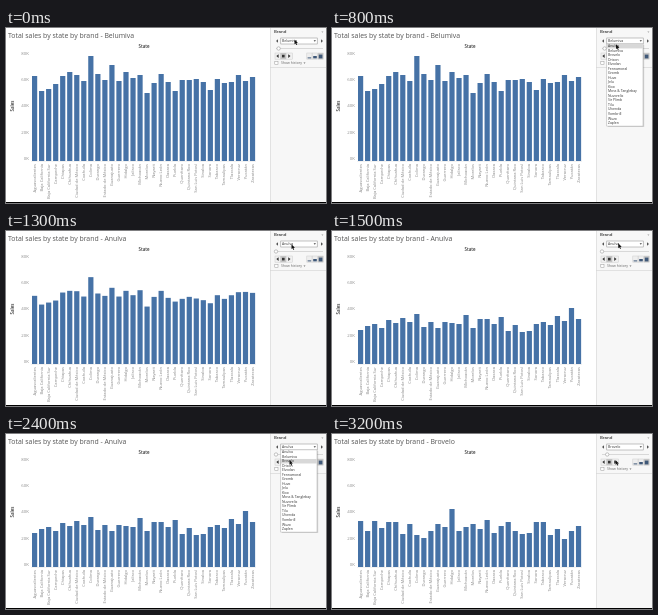
An HTML page with a canvas for the animation above (3.3 s loop, 320 by 175 pixels).

```html
<!DOCTYPE html>
<html lang="en">
<head>
<meta charset="utf-8">
<title>Sales by state</title>
<style>
html, body { margin: 0; width: 100%; height: 100%; overflow: hidden; background: #fff; }
canvas { display: block; width: 320px; height: 175px; }
</style>
</head>
<body>
<canvas id="stage"></canvas>
<script>
const W = 320, H = 175, LOOP = 3300, STEP = 100, BASE = 133;
const FONT = '"Open Sans", "Noto Sans", sans-serif';
const canvas = document.getElementById('stage');
const ctx = canvas.getContext('2d');
const dpr = window.devicePixelRatio || 1;
canvas.width = W * dpr;
canvas.height = H * dpr;

const brands = ['Anulva', 'Belumiva', 'Brovelo', 'Drixon', 'Elvodan', 'Fennamoral',
  'Gromb', 'Huvo', 'Jelu', 'Kixo', 'Moss & Tanglebay', 'Nuvorelix', 'Sir Plimb',
  'Tilu', 'Ulvenda', 'Vombrill', 'Wuzo', 'Zaplen'];

const states = ['Aguascalientes', 'Baja California', 'Baja California Sur', 'Campeche',
  'Chiapas', 'Chihuahua', 'Ciudad de México', 'Coahuila', 'Colima', 'Durango',
  'Estado de México', 'Guanajuato', 'Guerrero', 'Hidalgo', 'Jalisco', 'Michoacán',
  'Morelos', 'Nayarit', 'Nuevo León', 'Oaxaca', 'Puebla', 'Querétaro', 'Quintana Roo',
  'San Luis Potosí', 'Sinaloa', 'Sonora', 'Tabasco', 'Tamaulipas', 'Tlaxcala',
  'Veracruz', 'Yucatán', 'Zacatecas'];

// Top edge of each bar, by brand index
const tops = [
  [99, 95, 93, 97, 89, 92, 87, 91, 83, 96, 91, 97, 91, 92, 93, 84,
   97, 88, 88, 93, 86, 100, 94, 101, 100, 93, 91, 94, 85, 90, 77, 88],
  [48, 63, 61, 56, 48, 44, 47, 53, 28, 46, 52, 37, 53, 44, 50, 47,
   65, 55, 46, 54, 63, 52, 52, 51, 54, 62, 51, 55, 54, 47, 53, 49],
  [87, 97, 87, 94, 88, 88, 100, 90, 101, 104, 97, 90, 93, 75, 97, 93,
   90, 95, 86, 99, 92, 88, 97, 100, 99, 88, 88, 101, 95, 105, 97, 92]
];

const cursorPath = [
  [0, 288.5, 11.5], [500, 288.5, 11.5], [800, 284, 16.3], [1100, 284, 16.3],
  [1300, 285.5, 13.3], [1600, 286.5, 12], [1900, 286.5, 12], [2100, 285, 16.5],
  [2400, 283.5, 26], [3300, 283.5, 26]
];
const clicks = [[400, 700], [1000, 1200], [1600, 1900], [2600, 2800]];

const within = (t, a, b) => t >= a && t < b;
const lerp = (a, b, u) => a + (b - a) * u;
function ease(t, a, b) {
  const u = Math.min(1, Math.max(0, (t - a) / (b - a)));
  return u * u * (3 - 2 * u);
}

function cursorAt(t) {
  const i = Math.max(1, cursorPath.findIndex(p => p[0] > t));
  const [a, b] = [cursorPath[i - 1], cursorPath[i]];
  const u = ease(t, a[0], b[0]);
  return { x: lerp(a[1], b[1], u), y: lerp(a[2], b[2], u) };
}

function rect(x, y, w, h, fill) {
  ctx.fillStyle = fill;
  ctx.fillRect(x, y, w, h);
}

function frame(x, y, w, h, stroke, fill) {
  if (fill) rect(x, y, w, h, fill);
  ctx.strokeStyle = stroke;
  ctx.lineWidth = 0.5;
  ctx.strokeRect(x, y, w, h);
}

function poly(points, fill) {
  ctx.beginPath();
  points.forEach(([x, y]) => ctx.lineTo(x, y));
  ctx.closePath();
  ctx.fillStyle = fill;
  ctx.fill();
}

function circle(x, y, r, stroke, width, fill) {
  ctx.beginPath();
  ctx.arc(x, y, r, 0, Math.PI * 2);
  if (fill) { ctx.fillStyle = fill; ctx.fill(); }
  ctx.strokeStyle = stroke;
  ctx.lineWidth = width;
  ctx.stroke();
}

function label(str, x, y, size, color, { align = 'left', weight = 400, turn = false, base = 'middle' } = {}) {
  ctx.save();
  ctx.translate(x, y);
  if (turn) ctx.rotate(-Math.PI / 2);
  ctx.font = `${weight} ${size}px ${FONT}`;
  ctx.textAlign = align;
  ctx.textBaseline = base;
  ctx.fillStyle = color;
  ctx.fillText(str, 0, 0);
  ctx.restore();
}

function drawChart(brand, from, to, u) {
  label('Total sales by state by brand - ' + brands[brand], 2, 10, 6.9, '#555', { base: 'alphabetic' });
  label('State', 138, 19.2, 4.4, '#333', { align: 'center', weight: 600 });
  label('Sales', 7.2, 78, 4.4, '#333', { align: 'center', weight: 600, turn: true });
  for (let k = 0; k < 5; k++) {
    label(k * 20 + 'K', 22.8, 130.6 - k * 26.15, 4.3, '#8a8a8a', { align: 'right' });
  }
  rect(25, BASE, 225, 0.4, '#ddd');
  states.forEach((name, i) => {
    const x = 26 + i * 7.03, y = lerp(tops[from][i], tops[to][i], u);
    rect(x, y, 5.2, BASE - y, '#4672a6');
    label(name, x + 2.6, 136, 4.1, '#858585', { align: 'right', turn: true });
  });
}

function drawPanel(brand) {
  rect(264, 0, 56, H, '#f7f7f7');
  rect(264, 0, 0.6, H, '#d4d4d4');
  rect(264, 39, 56, 0.6, '#d4d4d4');
  label('Brand', 268, 4.2, 4.3, '#333', { weight: 600 });
  poly([[315.4, 3.6], [317.4, 3.6], [316.4, 4.8]], '#999');

  poly([[272, 11.3], [272, 14.7], [270, 13]], '#555');
  poly([[315, 11.3], [315, 14.7], [317, 13]], '#555');
  frame(274.8, 10, 36.4, 6, '#888', '#fff');
  label(brands[brand], 276, 13, 3.5, '#333');
  poly([[307.6, 12.2], [310, 12.2], [308.8, 13.8]], '#444');

  rect(270, 20.2, 47, 0.7, '#ccc');
  circle(270 + brand * 2.6, 20.5, 1.7, '#888', 0.5, '#fff');

  frame(269, 25, 17.5, 6.2, '#ccc', '#f0f0f0');
  rect(274.3, 25, 6, 6.2, '#c4c4c4');
  poly([[272.6, 26.2], [272.6, 30], [270.3, 28.1]], '#333');
  rect(276, 26.8, 2.6, 2.6, '#333');
  poly([[282.2, 26.2], [282.2, 30], [284.5, 28.1]], '#333');

  [1, 2.4, 3.8].forEach((h, i) => {
    const x = 300.8 + i * 5.6;
    frame(x, 25, 5.2, 6.2, '#ccc', i === 2 ? '#c4c4c4' : '#eee');
    rect(x + 0.8, 30.4 - h, 3.6, h, '#3f5878');
  });

  frame(268.8, 33.4, 3.2, 3.2, '#999', '#fff');
  label('Show history', 275, 35.2, 3.5, '#666');
  poly([[297.5, 34.5], [299.5, 34.5], [298.5, 35.8]], '#666');
}

function drawList(hover) {
  const top = 15.9, row = 4.53;
  rect(276, 17, 36.2, 82, 'rgba(0,0,0,0.15)');
  frame(274.8, top, 36.2, 82.2, '#aaa', '#fff');
  rect(275, top + hover * row, 35.8, row, '#d8d8d8');
  brands.forEach((name, i) => label(name, 276, top + (i + 0.5) * row, 3.45, '#333'));
}

function drawCursor({ x, y }) {
  const shape = [[0, 0], [0, 4.8], [1.1, 3.9], [1.9, 5.6], [2.7, 5.2], [1.9, 3.6], [3.4, 3.5]];
  poly(shape.map(([dx, dy]) => [x + dx, y + dy]), '#111');
}

function draw(t) {
  ctx.setTransform(dpr, 0, 0, dpr, 0, 0);
  rect(0, 0, W, H, '#fff');

  const brand = t < 1200 ? 1 : t < 2900 ? 0 : 2;
  if (t < 2800) drawChart(brand, 1, 0, ease(t, 1175, 1500));
  else drawChart(brand, 0, 2, ease(t, 2875, 3200));

  drawPanel(brand);
  const cursor = cursorAt(t);
  if (within(t, 500, 1200) || within(t, 1700, 2900)) {
    drawList(Math.max(0, Math.floor((cursor.y - 15.9) / 4.53)));
  }
  drawCursor(cursor);
  const click = clicks.find(([a, b]) => within(t, a, b));
  if (click) {
    const u = (t - click[0]) / (click[1] - click[0]);
    circle(cursor.x + 0.3, cursor.y + 0.2, 4 + 4.5 * u, '#111', 1.2);
  }
  rect(0, 174, W, 1, '#000');
}

function tick() {
  const t = performance.now() % LOOP;
  draw(Math.floor(t / STEP) * STEP);
  requestAnimationFrame(tick);
}
tick();
</script>
</body>
</html>
```
